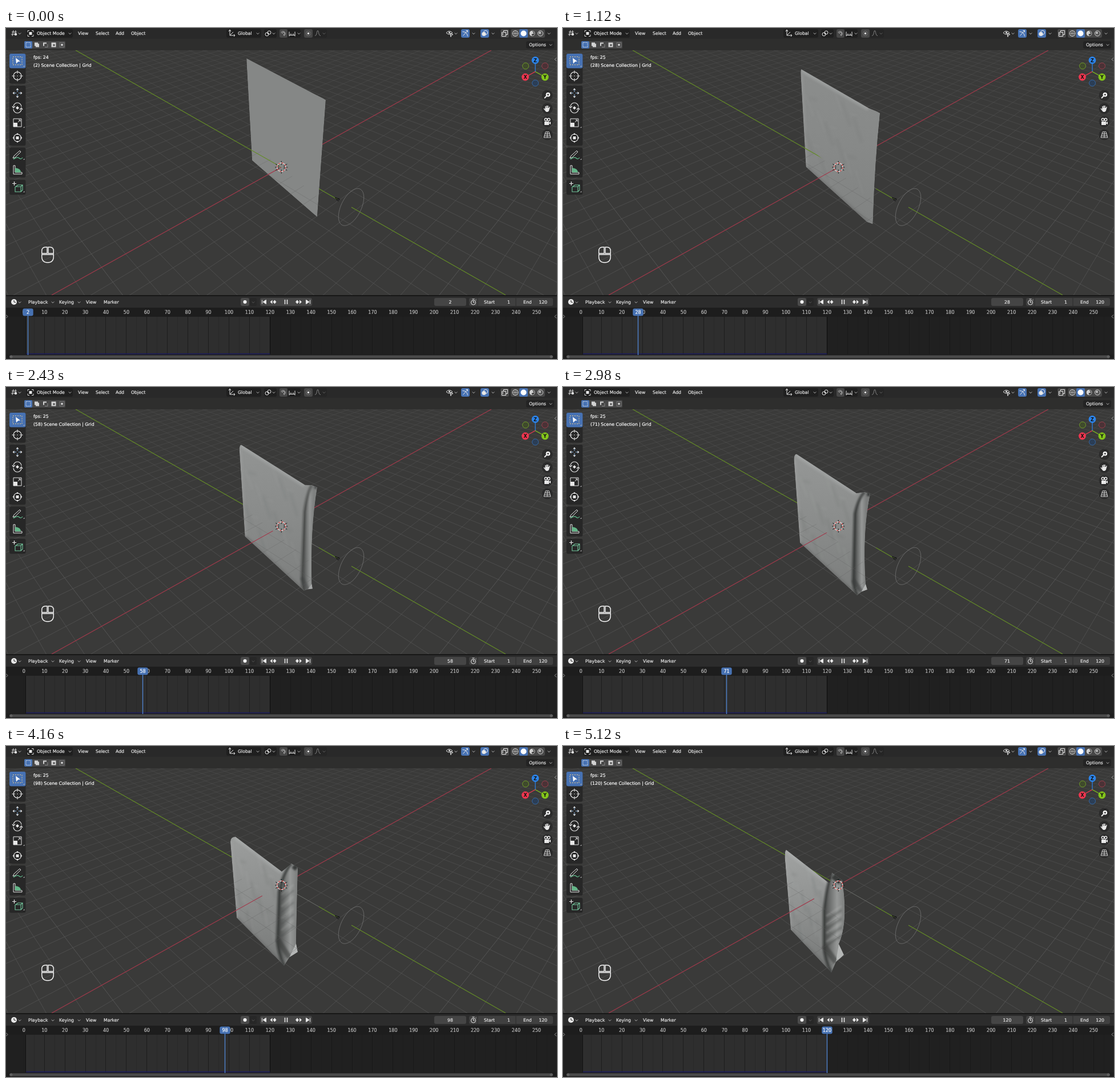
An HTML page with a canvas for the animation above (5.19 s loop, 965 px wide and 580 px high).

```html
<!DOCTYPE html>
<html>
<head>
<meta charset="utf-8">
<style>
html, body { margin: 0; width: 965px; height: 580px; overflow: hidden; background: #3a3a39; }
canvas { display: block; }
</style>
</head>
<body>
<canvas id="stage" width="965" height="580"></canvas>
<script>
const c = document.getElementById('stage').getContext('2d');
const LOOP = 5190, STEPS = 75;
const WHITE = '#e8e8e8', DARK = '#1f1f1f', MID = '#474747', BLUE = '#4772b3', RED = '#a3394b', GREEN = '#648c26';

// ---------- helpers ----------
const clamp = v => Math.max(0, Math.min(1, v));
const mix = (a, b, t) => a + (b - a) * t;
const grey = (v, a = 1) => `rgba(${v},${v + 2},${v + 1},${a})`;

function text(s, x, y, align = 'left', color = WHITE, size = 7.75) {
  c.font = size + 'px "DejaVu Sans", sans-serif';
  c.textAlign = align;
  c.fillStyle = c.strokeStyle = color;
  c.lineWidth = .2;
  c.fillText(s, x, y + 2.9);
  c.strokeText(s, x, y + 2.9);
}
function box(x, y, w, h, r, fill) {
  c.beginPath();
  c.roundRect(x, y, w, h, r);
  c.fillStyle = fill;
  c.fill();
}
function disc(x, y, r, fill, line, w = 1) {
  c.beginPath();
  c.arc(x, y, r, 0, 7);
  if (fill) { c.fillStyle = fill; c.fill(); }
  if (line) { c.strokeStyle = line; c.lineWidth = w; c.stroke(); }
}
function icon(x, y, d, line = WHITE, w = 1, fill) {
  const p = new Path2D(d);
  c.save();
  c.translate(x, y);
  if (fill) { c.fillStyle = fill; c.fill(p); }
  if (line) { c.strokeStyle = line; c.lineWidth = w; c.stroke(p); }
  c.restore();
}
const chevron = (x, y, color = '#b5b5b5') => icon(x, y, 'M-2.3-1L0 1.3 2.3-1', color);
function seg(x1, y1, x2, y2, color, w = 1) {
  c.beginPath();
  c.moveTo(x1, y1);
  c.lineTo(x2, y2);
  c.strokeStyle = color;
  c.lineWidth = w;
  c.stroke();
}

// ---------- ground ----------
const DIST = 21;
function ground(x, y) {
  const side = .703 * y - .711 * x, ahead = -.703 * x - .711 * y;
  const depth = DIST + ahead * .834;
  return [482.3 + 670 * side / depth, 234 + 670 * (.0149 * DIST - ahead * .552) / depth];
}
function grid(strength) {
  for (const major of [0, 1]) {
    const fade = c.createLinearGradient(0, 20, 0, 330);
    fade.addColorStop(0, `rgba(92,92,92,${.25 * strength})`);
    fade.addColorStop(1, `rgba(92,92,92,${(major ? .75 : .55) * strength})`);
    c.strokeStyle = fade;
    c.lineWidth = 1;
    c.beginPath();
    for (let n = -70; n <= 70; n++) {
      if (!n || (n % 10 === 0) != major) continue;
      c.moveTo(...ground(-120, n));
      c.lineTo(...ground((24 - .711 * n) / .703, n));
      c.moveTo(...ground(n, -120));
      c.lineTo(...ground(n, (24 - .703 * n) / .711));
    }
    c.stroke();
  }
}
function axes() {
  seg(80, 468, 850, 39, RED, 1.2);
  seg(122, 39, 482.3, 244, GREEN, 1.2);
  seg(482.3, 244, 548, 281.6, '#6b6d69');
  seg(548, 281.6, 580, 300, GREEN, 1.2);
  seg(605, 314, 875, 468, GREEN, 1.2);
}
function windField() {
  c.beginPath();
  for (let i = 0; i <= 60; i++) {
    const a = i * Math.PI / 30;
    c.lineTo(604.5 - 22.2 * Math.cos(a), 313.8 + 16.8 * Math.cos(a) - 27.8 * Math.sin(a));
  }
  c.strokeStyle = '#747474';
  c.lineWidth = .8;
  c.stroke();
  icon(580.5, 300, 'M-4-3L4 0 1 3.5-4-3M-2 1L3-1', '#111');
}
function cursor3d() {
  icon(482.3, 244, 'M-11 0H-4M4 0H11M0-11V-4M0 4V11M-10-5.6L-4-2M4 2L10 5.6M-10 5.6L-4 2M4-2L10-5.6', '#191919');
  disc(482.3, 244, 7.6, null, '#f2f2f2', 1.2);
  c.setLineDash([3, 3]);
  disc(482.3, 244, 7.6, null, '#d8403e', 1.2);
  c.setLineDash([]);
}

// ---------- cloth ----------
// corners: top left, valley, peak, top right, right side, waist, lobe, tip, bottom left, left side, two crease points
const KEYS = [2, 45, 71, 82, 98, 120];
const POSES = [
  [421, 53, 540, 115.5, 555, 123, 560, 126, 553, 221, 546, 317, 545, 331, 539, 326, 431, 232, 421.4, 60, 551, 200, 542, 300],
  [415, 85, 533, 157, 543, 160, 552, 164, 544, 250, 541, 345, 541, 352, 528, 349, 422, 251, 413, 93, 534, 215, 528, 330],
  [409, 117.5, 514, 186, 528, 184, 538, 187, 529, 260, 530, 345, 533, 355, 515, 365, 415, 273, 404.5, 127, 511, 222, 508, 338],
  [406, 134.5, 502, 201, 519, 193, 530, 198, 521, 285, 522, 346, 525, 357, 501, 373, 407, 279, 397, 152, 498, 230, 495, 340],
  [402, 159, 483, 220, 500, 206, 511, 213, 509, 290, 508, 346, 511, 361, 487, 385, 404, 301, 393, 168, 478, 255, 475, 338],
  [391, 182, 467, 241, 471, 222, 489, 235, 493, 300, 483, 347, 492, 366, 470, 397, 399, 322, 388.5, 195, 457, 290, 457, 350]
];
// where the red axis enters the cloth
const CUTS = [482, 473, 462, 457, 449, 440];

function cloth(f) {
  let k = 0;
  while (k < 4 && f > KEYS[k + 1]) k++;
  const t = (f - KEYS[k]) / (KEYS[k + 1] - KEYS[k]);
  const v = POSES[k].map((a, i) => mix(a, POSES[k + 1][i], t));
  const pts = [];
  for (let i = 0; i < 24; i += 2) pts.push([v[i], v[i + 1]]);
  const [tl, valley, peak, tr, right, waist, lobe, tip, bl, left, q0, q1] = pts;
  const s = (f - 2) / 118, fold = clamp((f - 28) / 43), soft = clamp((f - 2) / 26);
  const late = 3 * clamp((f - 45) / 60);
  const inner = [(lobe[0] + tip[0]) / 2 - late, (lobe[1] + tip[1]) / 2 - late];
  const bulge = [0, 1].map(i => 2 * right[i] - (tr[i] + waist[i]) / 2);

  const shape = new Path2D();
  shape.moveTo(...tl);
  for (const p of [valley, peak, tr]) shape.lineTo(...p);
  shape.quadraticCurveTo(...bulge, ...waist);
  for (const p of [lobe, inner, tip, bl, left]) shape.lineTo(...p);
  shape.quadraticCurveTo(left[0], tl[1], ...tl);

  c.save();
  c.clip(shape);
  let g = c.createLinearGradient(440, tl[1], 452, tip[1]);
  g.addColorStop(0, grey(mix(133, 160, s)));
  g.addColorStop(.5, grey(mix(133, 142, s)));
  g.addColorStop(1, grey(mix(133, 116, s)));
  c.fillStyle = g;
  c.fill(shape);

  // soft shading near the rims and small wrinkles
  c.filter = 'blur(2px)';
  seg(...tl, ...valley, grey(190, .35 * soft), 9);
  seg(...bl, ...tip, grey(70, .3 * soft), 5);
  seg(...left, ...bl, grey(185, .2 * soft), 7);
  const spot = (a, b) => [
    mix(mix(tl[0], bl[0], b), mix(valley[0], q1[0], b), a),
    mix(mix(tl[1], bl[1], b), mix(valley[1], tip[1], b), a)];
  for (let i = 0; i < 18; i++) {
    const a = (i * .381 + .1) % .85, b = (i * .617 + .25) % .85;
    seg(...spot(a, b), ...spot(a + .12, b + (i % 3 ? .17 : -.03)), grey(i % 2 ? 180 : 80, .17 * soft * mix(.4, 1, s)), 3);
  }
  c.filter = 'none';

  if (fold) {
    const crease = new Path2D();
    crease.moveTo(...peak);
    crease.quadraticCurveTo(mix(q0[0], peak[0], .35), mix(peak[1], q0[1], .3), ...q0);
    crease.lineTo(...q1);
    crease.quadraticCurveTo(q1[0], mix(q1[1], tip[1], .5), ...tip);

    const flap = new Path2D(crease);
    for (const p of [inner, lobe, waist]) flap.lineTo(...p);
    flap.quadraticCurveTo(...bulge, ...tr);
    g = c.createLinearGradient(q0[0], 0, right[0] + 2, 0);
    g.addColorStop(0, grey(72, fold));
    g.addColorStop(.3, grey(112, fold));
    g.addColorStop(.6, grey(150, fold));
    g.addColorStop(1, grey(122, fold));
    c.fillStyle = g;
    c.fill(flap);

    // underside shadows and the radiating ripples of the flap
    c.filter = 'blur(1.5px)';
    c.strokeStyle = grey(58, .8 * fold);
    c.lineWidth = 5;
    c.stroke(crease);
    seg(...q1, ...inner, grey(60, .6 * fold), 4 + 6 * s);
    seg(peak[0] + 5, peak[1] + 2, ...tr, grey(48, .9 * fold), 5 + 14 * s * s);
    const ripple = clamp((f - 75) / 30);
    for (let i = 0; i < 8; i++) {
      const y = mix(q0[1], q1[1], i / 8 - .1);
      seg(q0[0] + 4, y + 14, right[0] - 5, y - 4, grey(i % 2 ? 60 : 180, .4 * ripple), 2.5);
    }
    c.filter = 'blur(.6px)';
    c.beginPath();
    for (const p of [waist, lobe, inner]) c.lineTo(...p);
    c.fillStyle = grey(185, .9 * fold);
    c.fill();
    c.filter = 'none';
  }

  // the part under the floor is seen through the grid
  const cx = mix(CUTS[k], CUTS[k + 1], t), cy = 244 - .557 * (cx - 482.3);
  c.beginPath();
  c.moveTo(cx - 200, cy - 162);
  c.lineTo(cx + 200, cy + 162);
  c.lineTo(cx + 200, 468);
  c.lineTo(cx - 200, 468);
  c.clip();
  grid(.6);
  axes();
  c.restore();
}

// ---------- interface ----------
function header() {
  box(0, 0, 965, 39, 0, '#2e2e2d');
  box(0, 0, 965, 19, 0, '#292929');
  icon(15, 9, 'M-5-2H4M-6 2H2M-2-5L-4 5M2-5L1 0', WHITE, .9);
  disc(17, 11, 2.2, WHITE);
  chevron(24, 9.5);
  box(35, 2, 82, 15, 3, DARK);
  icon(43, 9.5, 'M-2.5-2.5H2.5V2.5H-2.5Z', null, 1, WHITE);
  icon(43, 9.5, 'M-5-2V-5H-2M2-5H5V-2M5 2V5H2M-2 5H-5V2', WHITE, .9);
  text('Object Mode', 54, 9);
  chevron(112, 9.5);
  text('View', 126, 9);
  text('Select', 157, 9);
  text('Add', 192, 9);
  text('Object', 219, 9);

  box(386, 2, 61, 15, 3, DARK);
  icon(395, 9, 'M-3-6V4H6M-3 4L3-2M-5-3L-3-6-1-3M4 2L6 4 4 6');
  text('Global', 406, 9);
  chevron(441, 9.5);
  box(452, 2, 22, 15, 3, DARK);
  disc(457, 11, 3, null, WHITE);
  disc(461, 8, 3, null, WHITE);
  disc(459, 9.5, 1.2, WHITE);
  chevron(469, 9.5);
  box(479, 2, 14, 15, 3, MID);
  icon(486, 9.5, 'M-4-2A4 4 0 1 1 1 4L0 2A2 2 0 1 0-2 0Z', '#b0b0b0');
  box(493, 2, 23, 15, 3, DARK);
  icon(501, 9.5, 'M-5-3V5M5-3V5M-5 3H5M-2 0V3M2 0V3');
  chevron(513, 9.5);
  box(522, 2, 15, 15, 3, MID);
  disc(529.5, 9.5, 4, null, '#707070');
  disc(529.5, 9.5, 1.7, WHITE);
  box(538, 2, 24, 15, 3, '#252525');
  icon(546, 9.5, 'M-5 4C-1 4-2-5 0-5S1 4 5 4', '#858585');
  chevron(557, 9.5, '#606060');

  icon(777, 8.5, 'M-6 0Q-1-6 5 0Q-1 5-6 0M1 1L6 3 3 4 2 7Z');
  disc(776.5, 8, 1.5, WHITE);
  chevron(788, 9.5);
  box(797, 2, 15, 15, 3, BLUE);
  icon(804.5, 9.5, 'M-5-3Q3-3 4 5M-4 4L4-5M1-5H4V-2', WHITE);
  chevron(819, 9.5);
  box(831, 2, 15, 15, 3, BLUE);
  disc(837, 10.5, 3.6, WHITE);
  disc(840, 8, 3.6, null, WHITE);
  chevron(853, 9.5);
  box(866, 2, 15, 15, 3, MID);
  icon(873.5, 9.5, 'M-5-2H2V5H-5ZM-2-2V-5H5V2H2M-5 1H-2');
  box(884, 2, 60, 15, 3, MID);
  box(899, 2, 15, 15, 2, BLUE);
  disc(892, 9.5, 5, null, '#d0d0d0');
  icon(892, 9.5, 'M-5 0H5M0-5V5M-3-4Q0 0-3 4M3-4Q0 0 3 4', '#d0d0d0', .6);
  disc(906.5, 9.5, 5, '#fff');
  disc(921.5, 9.5, 4.8, '#d0d0d0');
  icon(921.5, 9.5, 'M0-4A4 4 0 0 1 0 4Q-3 1 3 0Z', null, 1, '#444');
  disc(936, 9.5, 4.6, '#555', '#d0d0d0');
  disc(935, 8.5, 2, '#c0c0c0');
  chevron(951, 9.5);

  box(32, 23, 72, 13, 2, MID);
  box(32, 23, 14, 13, 2, BLUE);
  c.setLineDash([1.5, 1.2]);
  icon(39, 29.5, 'M-4-4H4V4H-4Z');
  c.setLineDash([]);
  icon(54, 29.5, 'M-4-4H2V-2H4V4H-2V2H-4Z', null, 1, '#d2d2d2');
  icon(69, 29.5, 'M-4-4H2V-2H-2V2H-4Z', null, 1, '#d2d2d2');
  icon(69, 29.5, 'M4-1V4H-1', '#888');
  icon(83.5, 29.5, 'M-4-4H4V4H-4ZM-1-1V2H2V-1Z', null, 1, '#d2d2d2');
  icon(98, 29.5, 'M-4-4H4V4H-4Z', '#777');
  box(96.3, 27.8, 3.4, 3.4, 0, '#d2d2d2');
  box(911, 23, 49, 13, 3, '#232323');
  text('Options', 916, 29.5);
  chevron(954, 29.5);
}
function toolbar() {
  for (const [y, n] of [[45, 2], [101, 4], [209.5, 2], [266, 1]]) box(6, y, 28.5, n * 26.3, 3, '#272727');
  box(6, 45, 28.5, 25.5, 3, BLUE);
  c.setLineDash([2, 2]);
  icon(20, 57.5, 'M-8-7H8V7H-8Z', '#e8c98c');
  c.setLineDash([]);
  icon(20, 57.5, 'M-3-5L5 1 1 1.5-2 5Z', null, 1, '#fff');
  disc(20, 84, 7, null, '#fff', 1.1);
  icon(20, 84, 'M-9.5 0H-4M4 0H9.5M0-9.5V-4M0 4V9.5');
  disc(20, 84, .8, WHITE);
  const arrows = 'M-2.5-5.5L0-8.5 2.5-5.5ZM-2.5 5.5L0 8.5 2.5 5.5ZM-5.5-2.5L-8.5 0-5.5 2.5ZM5.5-2.5L8.5 0 5.5 2.5Z';
  icon(20, 114, arrows, null, 1, WHITE);
  icon(20, 114, 'M-6 0H-2M2 0H6M0-6V-2M0 2V6', '#8ab3dd');
  icon(20, 140, 'M-7-2A7 7 0 0 1 7-2M7 2A7 7 0 0 1-7 2M-9-3L-7 0-4-3M9 3L7 0 4 3', WHITE, 1.2);
  icon(20, 140, 'M0-3L3 0 0 3-3 0Z', null, 1, WHITE);
  icon(20, 166, 'M-7-7H7V7H-7Z');
  icon(20, 166, 'M-7 0H0V7H-7Z', null, 1, WHITE);
  icon(20, 166, 'M1-1L5-5M2-5H5V-2');
  disc(20, 192.5, 6.5, null, WHITE, 1.1);
  icon(20, 192.5, arrows + 'M-2.5-2.5H2.5V2.5H-2.5Z', null, 1, WHITE);
  icon(20, 222, 'M-8 6L-6 2 4-7 6-5-4 5Z', WHITE, 1);
  icon(20, 222, 'M-7 8Q0 3 3 6T9 5', '#62c190', 1.2);
  icon(20, 249, 'M-7-8V7H8V4H-4V-8Z', WHITE, 1);
  icon(20, 249, 'M-4-4Q6-3 6 4H-4Z', null, 1, '#63b487');
  icon(21, 280, 'M-4-2L0-5H8V4L5 7H-5V-2M-5-2H5L8-5M5-2V7', '#74c79d', 1.1);
  icon(14.5, 272.5, 'M-3.5 0H3.5M0-3.5V3.5', WHITE, 1.2);
  for (const y of [68, 175, 231, 288]) icon(32.5, y, 'M0-2.5V0H-2.5Z', null, 1, '#aaa');
}
function overlays() {
  const x = 927, y = 76.5;
  seg(x, y, x, 56, '#2c7fe0', 1.3);
  seg(x, y, 909.5, 86, '#f0364f', 1.3);
  seg(x, y, 944, 86, '#80c21b', 1.3);
  disc(910, 66.5, 5.5, '#3f4a2c', '#6f9a2a');
  disc(944, 66.5, 5.5, '#4b3236', '#98404c');
  disc(x, 96.5, 5.5, '#2b3e56', '#3568a5');
  for (const [px, py, col, n] of [[x, 56.5, '#2c84ea', 'Z'], [909.5, 86, '#f0364f', 'X'], [944, 86, '#82c41b', 'Y']]) {
    disc(px, py, 6.4, col);
    c.font = 'bold 8px "DejaVu Sans", sans-serif';
    c.textAlign = 'center';
    c.fillStyle = '#111';
    c.fillText(n, px, py + 3);
  }
  for (const py of [118, 141, 164, 187]) disc(948, py, 9.5, '#2b2b2b');
  disc(949.3, 116.8, 3.8, '#fff');
  icon(948, 118, 'M-1 1L-5 5', WHITE, 2);
  icon(949.3, 116.8, 'M-2 0H2M0-2V2', '#222');
  icon(948, 141, 'M-2 5L-6 0M-3 1V-4M-1 0V-5M1 0V-5M3.2 1L4-3', WHITE, 1.4);
  icon(948, 141, 'M-4 1L-3-1H4L3 4 1 6H-2Z', null, 1, WHITE);
  disc(945.5, 160.5, 2.2, null, WHITE, 1.4);
  disc(950.5, 160.5, 2.2, null, WHITE, 1.4);
  icon(948, 164, 'M-5 0H3V2L6 0V5L3 3V6H-5Z', null, 1, WHITE);
  icon(948, 187, 'M-3-5H3L6 5H-6ZM-4-1.5H4M-5 2H5M0-5V5', WHITE, .9);
  icon(962, 55, 'M2-3L-1 0 2 3', '#999');

  // mouse: two buttons above the body
  icon(73, 397, 'M-1-2V-13H-4Q-10.3-13-10.3-6V-2ZM1-2V-13H4Q10.3-13 10.3-6V-2ZM-10.3 0H10.3V4Q10 14 0 14T-10.3 4Z', '#f4f4f4', 1.4);
}

const frameX = f => 31.3 + f * 3.592;
function timeline(f) {
  box(0, 468, 965, 112, 0, '#171717');
  box(0, 470, 965, 20, 0, '#2c2c2c');
  box(0, 490, 965, 90, 0, '#1d1d1d');
  box(0, 506, 965, 66, 0, '#202020');
  box(frameX(1), 506, frameX(120) - frameX(1), 66, 0, '#2e2e2e');
  for (let n = 0; n <= 255; n += 5) {
    const x = Math.floor(frameX(n)) + .5;
    seg(x, 506, x, 572, n > 120 ? (n % 10 ? '#1e1e1e' : '#181818') : n % 10 ? '#282828' : '#1d1d1d');
    if (n % 10 === 0) text(n, frameX(n), 498, 'center', '#bcbcbc', 8);
  }
  seg(34.5, 506, 34.5, 572, '#111');
  seg(462.5, 506, 462.5, 572, '#0c0c0c');
  seg(frameX(1), 571, frameX(120), 571, '#19195e', 1.4);

  box(6, 573.5, 952, 5, 2.5, '#4a4a4a');
  disc(9, 576, 2.5, '#606060');
  disc(955, 576, 2.5, '#606060');
  icon(1, 505.5, 'M-1-3L2 0-1 3', '#999');
  icon(963, 505.5, 'M1-3L-2 0 1 3', '#999');

  disc(14, 480, 5, WHITE);
  icon(14, 480, 'M0-3V0L3 1', '#222', 1);
  chevron(24, 480.5);
  text('Playback', 39, 480);
  chevron(82, 480.5);
  text('Keying', 93, 480);
  chevron(128, 480.5);
  text('View', 140, 480);
  text('Marker', 171, 480);

  box(411, 473, 15, 14, 3, '#4b4b4b');
  disc(418.5, 480, 3, '#fff');
  box(427, 473, 12, 14, 3, '#272727');
  chevron(433, 480.5, '#555');
  box(445, 473, 91, 14, 3, '#464646');
  icon(452, 480, 'M-3.5-3.5V3.5M3.5-3.5V3.5L-2 0Z', WHITE, 1, WHITE);
  icon(467.5, 480, 'M-5 0L-1-3.5V3.5ZM0 0L3-3.5 6 0 3 3.5Z', null, 1, WHITE);
  icon(490.5, 480, 'M-2-4V4M2-4V4', WHITE, 1.6);
  icon(513, 480, 'M5 0L1-3.5V3.5ZM0 0L-3-3.5-6 0-3 3.5Z', null, 1, WHITE);
  icon(529, 480, 'M3.5-3.5V3.5M-3.5-3.5V3.5L2 0Z', WHITE, 1, WHITE);

  box(750, 473, 56, 14, 3, '#454545');
  text(f, 778, 480, 'center');
  box(811, 473, 147, 14, 3, '#404040');
  seg(826, 473, 826, 487, '#2c2c2c');
  seg(893, 473, 893, 487, '#2c2c2c');
  disc(818.5, 481, 4, null, WHITE);
  icon(818.5, 481, 'M0-3V0H2M-2-6H2M4-4L5-5');
  text('Start', 837, 480);
  text('1', 883, 480, 'right');
  text('End', 906, 480);
  text('120', 948, 480, 'right');

  const x = Math.floor(frameX(f)) + .5;
  seg(x, 503, x, 573, '#4f82cc', 1.4);
  box(x - 9.2, 491.5, 18.4, 13, 3, BLUE);
  text(f, x, 498, 'center', '#fff', 8);
}

// ---------- loop ----------
let shown = -1;
function tick(now) {
  const step = Math.floor(now % LOOP / LOOP * STEPS + .15) % STEPS;
  if (step !== shown) {
    shown = step;
    const f = Math.round(2 + step * 118 / (STEPS - 1));
    box(0, 0, 965, 580, 0, '#3a3a39');
    grid(1);
    axes();
    windField();
    cloth(f);
    cursor3d();
    header();
    toolbar();
    overlays();
    text('fps: ' + (step < 6 ? 24 : 25), 48, 51, 'left', '#fff');
    text(`(${f}) Scene Collection | Grid`, 48, 65, 'left', '#fff');
    timeline(f);
  }
  requestAnimationFrame(tick);
}
requestAnimationFrame(tick);
</script>
</body>
</html>
```
